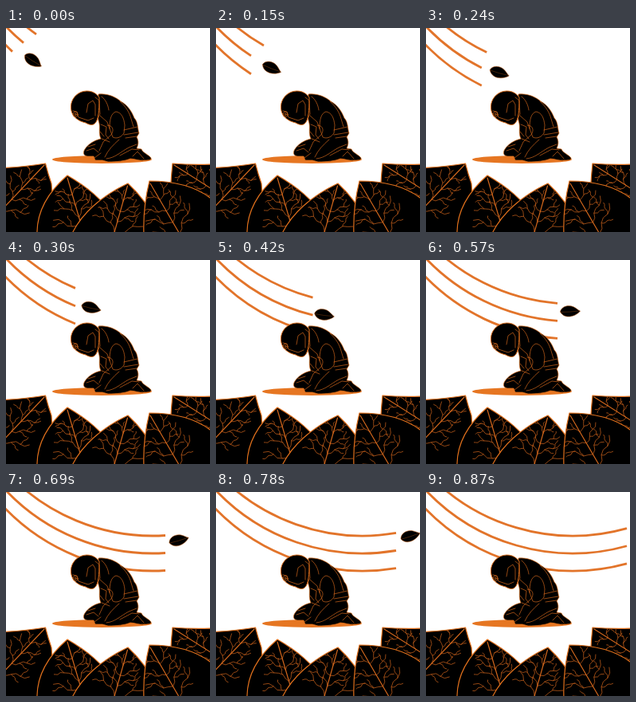
An HTML page for the animation above (0.9 s loop, 256 px wide and 256 px high).

```html
<!DOCTYPE html>
<html lang="en">
<head>
<meta charset="utf-8">
<title>Kneeling figure and drifting leaf</title>
<style>
html, body { margin: 0; width: 100%; height: 100%; overflow: hidden; background: #fff; }
svg { display: block; width: 100vw; height: 100vh; }
.ink { fill: #000; stroke: #e0701c; stroke-width: 1.2; stroke-linejoin: round; }
.line { fill: none; stroke: #d0661c; stroke-width: .7; stroke-linecap: round; stroke-linejoin: round; }
.vein { stroke: #b95a1a; stroke-width: .8; }
.rib { stroke: #d0661c; stroke-width: 1.2; }
.trail { fill: none; stroke: #e2742a; stroke-width: 2.8; }
</style>
</head>
<body>
<svg viewBox="0 0 256 256">
  <g id="trails"></g>
  <ellipse cx="120.5" cy="165" rx="62.5" ry="5" fill="#e67622"/>
  <g id="figure">
    <path class="ink" style="stroke-width:.7" d="M116 83 C127 82 137 86 144 92 C153 97 158 105 161 113 C166 118 165 126 167 132 L164 137 C167 142 166 147 164 151 L170 152 C172 157 178 158 182 163 C183 166 177 166 173 166 C167 167 161 164 156 164 C149 167 139 168 128 168 L121 166 L112 166 L110 161 L102 161 C96 160 97 155 99 152 C103 146 110 141 119 139 C116 132 118 126 117 120 L115 112 Z"/>
    <path class="ink" style="stroke-width:1" d="M117 87 C111 78 99 77 91 82 C83 87 80 96 82 104 C84 112 91 117 100 119 C105 122 110 123 113 118 C117 112 117 96 117 87 Z"/>
    <g class="line">
      <circle cx="87" cy="108.5" r="3.1"/><circle cx="87" cy="108.5" r="1.2"/>
      <path d="M84 104 L89 105 L91 112 L103 116 L110 113 M101 106 L103 95 L109 91 L112 96 L112 110"/>
      <path d="M112 87 L117 91 L118 108 L114 116 M120 86 C125 90 128 96 129 103"/>
      <path d="M130 126 C130 114 132 107 138 105 C145 106 148 113 149 122 L148 132 C144 138 138 139 134 137 L130 126"/>
      <path d="M143 92 C150 98 155 106 157 114 L160 124 M118 110 L127 118 L130 126"/>
      <path d="M119 121 L126 124 L125 134 L129 139 M118 130 L123 136 M127 122 C134 122 136 128 132 134 L122 143 L117 154"/>
      <path d="M148 128 L165 124 M148 134 L166 131 M150 138 L164 136 M120 139 L130 143"/>
      <path d="M142 140 C135 146 128 153 124 162 M126 164 C137 163 143 156 154 150 L164 146 M143 160 L158 152 L167 153"/>
      <path d="M103 149 L112 146 M101 154 L110 151 L116 156 M111 163 L119 157 M159 161 L165 155 L173 164"/>
    </g>
  </g>
  <g id="foliage"></g>
  <g id="leaf">
    <path d="M-12.5 -1.5 C-10 -8 -1 -9 5 -5 C8 -3 10 0 12.5 1.5 C5 8 -9 9 -12.5 -1.5Z" fill="#000" stroke="#c8641c" stroke-width=".5"/>
    <path class="line" style="stroke-width:.3" d="M-12 -1 Q0 1 11 1.2"/>
  </g>
</svg>
<script>
const NS = "http://www.w3.org/2000/svg";
const $ = id => document.getElementById(id);

function add(parent, tag, attrs) {
  const el = document.createElementNS(NS, tag);
  for (const k in attrs) el.setAttribute(k, attrs[k]);
  return parent.appendChild(el);
}

let seed = 11;
function rnd() {
  seed = (seed * 16807) % 2147483647;
  return seed / 2147483647;
}

// A wavy twig that may fork
function twig(x, y, angle, len, depth) {
  let d = `M${x.toFixed(1)} ${y.toFixed(1)}`, forks = "";
  const steps = 6, wave = rnd() * 6;
  for (let i = 0; i < steps; i++) {
    const a = angle + Math.sin(wave + i * 1.6) * .5;
    x += Math.cos(a) * len / steps;
    y += Math.sin(a) * len / steps;
    d += `L${x.toFixed(1)} ${y.toFixed(1)}`;
    if (depth && (i === 1 || i === 3))
      forks += twig(x, y, angle + (i === 1 ? .8 : -.8), len * .38, depth - 1);
  }
  return d + forks;
}

// Twigs on both sides of the midrib, from base to tip
function veins(bx, by, tx, ty, len) {
  const a = Math.atan2(ty - by, tx - bx);
  let d = "";
  for (let i = 0; i < 4; i++) {
    const p = .06 + i * .21;
    for (const s of [-1, 1])
      d += twig(bx + (tx - bx) * p, by + (ty - by) * p, a + s * (.75 + rnd() * .25), len * (1 - p * .65), 1);
  }
  return d;
}

const plants = [
  ["M-3 175.5 Q25 174 49.5 170 Q53 184 57 195 L62 260 H-3Z", [-8, 231, 48, 172], 38],
  ["M209 170 Q232 172 260 171 V260 H206 Q205 205 209 170Z", [266, 207, 211, 172], 32],
  ["M77 185 C101 199 122 215 137 240 L140 260 H39 C38 229 55 204 77 185Z", [97, 256, 77, 188], 42],
  ["M153 195 C166 207 178 222 187 240 V260 H82 C94 233 121 210 153 195Z", [135, 260, 152.5, 198], 40],
  ["M180 192 C209 192 237 197 260 216 V260 H173 C172 235 175 212 180 192Z", [220, 262, 181, 195], 44]
];

plants.forEach(([shape, rib, len], i) => {
  const g = $("foliage");
  add(add(g, "clipPath", { id: "c" + i }), "path", { d: shape });
  add(g, "path", { class: "ink", d: shape });
  const inner = add(g, "g", { class: "line", "clip-path": `url(#c${i})` });
  const [bx, by, tx, ty] = rib;
  add(inner, "path", { class: "vein", d: veins(...rib, len) });
  add(inner, "path", { class: "rib", d: `M${bx} ${by}L${tx} ${ty}` });
});

const trails = [0, 1, 2].map(() => add($("trails"), "path", { class: "trail" }));

// step, leaf x, y, angle, then the right end of each trail
const keys = [
  [0, 34, 41, 27, 38, 22, 8],
  [5, 70, 50.5, 16, 60, 44, 44],
  [10, 107, 60, 7, 87, 87, 87],
  [14, 136, 69, 2, 121.5, 121.5, 121.5],
  [19, 181, 64.5, -9, 165, 165, 165],
  [23, 217, 60.5, -22, 200, 200, 200],
  [29, 271, 50, -26, 252, 252, 252]
];

const STEP = 30, COUNT = 30;

// Each trail is a circular arc whose lowest point is at x = 184
function trailPath(i, end) {
  const r = 250 + 4 * i, low = 55 + 22 * i;
  const y = x => low - r + Math.sqrt(r * r - (x - 184) ** 2);
  return `M-4 ${y(-4)}A${r} ${r} 0 0 0 ${end} ${y(end)}`;
}

function pose(n) {
  let i = 0;
  while (i < keys.length - 2 && n >= keys[i + 1][0]) i++;
  const a = keys[i], b = keys[i + 1], p = (n - a[0]) / (b[0] - a[0]);
  return a.map((v, k) => v + (b[k] - v) * p);
}

function draw(ms) {
  const [, x, y, angle, ...ends] = pose(Math.floor(ms / STEP) % COUNT);
  $("leaf").setAttribute("transform", `translate(${x} ${y}) rotate(${angle})`);
  trails.forEach((t, i) => t.setAttribute("d", trailPath(i, ends[i])));
}

const start = performance.now();
function tick() {
  draw(performance.now() - start);
  requestAnimationFrame(tick);
}
draw(0);
requestAnimationFrame(tick);
</script>
</body>
</html>
```
